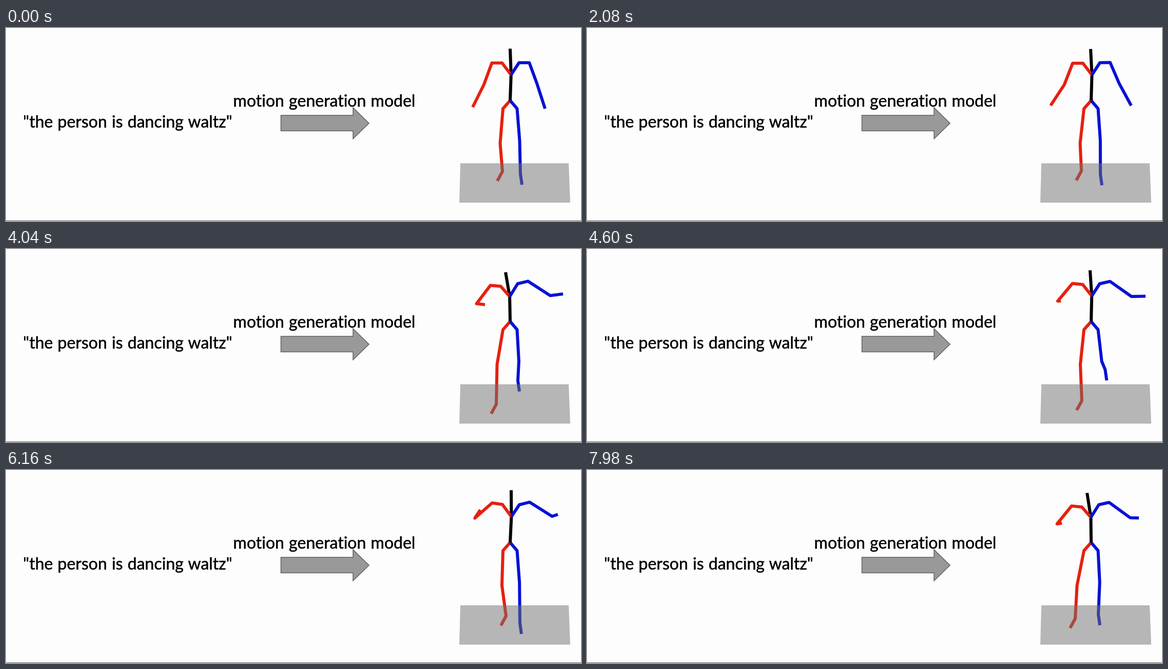
An HTML page for the animation above (8 s loop, 1120x378 px).

```html
<!DOCTYPE html>
<html lang="en">
<head>
<meta charset="utf-8">
<title>Motion generation</title>
<style>
  html, body { margin: 0; width: 100%; height: 100%; overflow: hidden; background: #fdfdfd; }
  svg { display: block; width: 1120px; height: 378px; }
  text {
    font: 32px Lato, sans-serif; font-variant-ligatures: none; word-spacing: 1px;
    text-anchor: middle; fill: #000; stroke: #000; stroke-width: .5;
  }
  .arrow { fill: #999; stroke: #606060; stroke-width: 1.5; }
  .floor { fill: #707070; opacity: .5; }
  .limb { fill: none; stroke-width: 6; stroke-linejoin: round; }
  .red { stroke: #e6200f; }
  .blue { stroke: #0812d4; }
  .spine { stroke: #000; }
</style>
</head>
<body>
<svg viewBox="0 0 1120 378">
  <path class="arrow" d="M535.5 171H676V156L707 186.5L676 217V201.500H535.5Z"/>
  <text x="620" y="154">motion generation model</text>
  <text x="237" y="195">"the person is dancing waltz"</text>
  <path class="limb red" id="redLeg"/>
  <path class="limb blue" id="blueLeg"/>
  <path class="limb spine" id="spine"/>
  <path class="limb red" id="redArm"/>
  <path class="limb blue" id="blueArm"/>
  <path class="floor" d="M885 265H1096L1099 342H883Z"/>
  <rect y="377" width="1120" height="1" fill="#606060"/>
</svg>
<script>
const LOOP = 8000;
const PELVIS = [982, 142];

// Key poses: sideways lean of the head, then where hands and ankles are.
const poses = [
  { at: 0,    lean: 0,  redHand: [909, 155], blueHand: [1050, 158], redAnkle: [967, 281], blueAnkle: [1002, 286] },
  { at: 2080, lean: -1, redHand: [903, 152], blueHand: [1060, 152], redAnkle: [963, 280], blueAnkle: [1000, 287] },
  { at: 3100, lean: -8, redHand: [913, 125], blueHand: [1082, 104], redAnkle: [950, 269], blueAnkle: [994, 276] },
  { at: 4040, lean: -9, redHand: [933, 109], blueHand: [1085, 88],  redAnkle: [955, 304], blueAnkle: [997, 258] },
  { at: 5180, lean: 5,  redHand: [913, 94],  blueHand: [1091, 97],  redAnkle: [973, 290], blueAnkle: [1022, 214] },
  { at: 6160, lean: 2,  redHand: [924, 78],  blueHand: [1075, 87],  redAnkle: [974, 286], blueAnkle: [1001, 300] },
  { at: 7980, lean: -8, redHand: [925, 104], blueHand: [1075, 94],  redAnkle: [951, 291], blueAnkle: [996, 283] }
];

const mix = (a, b, k) => a + (b - a) * k;
const mixPoint = (p, q, k) => p.map((v, i) => mix(v, q[i], k));
const move = ([x, y], dx, dy) => [x + dx, y + dy];

function swing(from, degrees, length) {
  const a = degrees * Math.PI / 180;
  return move(from, Math.sin(a) * length, Math.cos(a) * length);
}

function draw(id, ...points) {
  document.getElementById(id).setAttribute("d", "M" + points.join("L"));
}

function poseAt(t) {
  const next = Math.max(1, poses.findIndex(p => p.at > t));
  const i = t >= poses.at(-1).at ? poses.length - 1 : next;
  const a = poses[i - 1], b = poses[i];
  const k = Math.min(1, (t - a.at) / (b.at - a.at));
  const pose = { lean: mix(a.lean, b.lean, k) };
  for (const joint of ["redHand", "blueHand", "redAnkle", "blueAnkle"])
    pose[joint] = mixPoint(a[joint], b[joint], k);
  return pose;
}

function drawBody({ lean, redHand, blueHand, redAnkle, blueAnkle }) {
  const head = [PELVIS[0] + lean, 40.5 - lean * .55];
  const chest = move(PELVIS, 1.8 + lean * .3, -50.3 - lean * .15);
  draw("spine", head, chest, PELVIS);

  // A raised hand lifts the shoulder and swings the upper arm outwards.
  const redLift = 155 - redHand[1];
  const redNeck = [chest[0] - 17.5, 68.5 - lean * .5];
  const redShoulder = move(redNeck, -20, -redLift * .04);
  const redElbow = swing(redShoulder, -20 - redLift * .37, 45);
  draw("redArm", chest, redNeck, redShoulder, redElbow, redHand);

  const blueLift = 158 - blueHand[1];
  const blueNeck = [chest[0] + 15.5, 68];
  const blueShoulder = move(blueNeck, 20, -blueLift * .07);
  const blueElbow = swing(blueShoulder, 20 + blueLift * .53, 44 + blueLift * .11);
  draw("blueArm", chest, blueNeck, blueShoulder, blueElbow, blueHand);

  // Knees stay at one height and follow the ankles sideways.
  const redHip = move(PELVIS, -14, 16);
  const redKnee = move(redHip, (redAnkle[0] - redHip[0]) * .5 - 5, 68);
  draw("redLeg", PELVIS, redHip, redKnee, redAnkle, move(redAnkle, -10, 18.5));

  const blueHip = move(PELVIS, 13.5, 16);
  const blueKnee = move(blueHip, (blueAnkle[0] - blueHip[0]) * .3 + 3, 62);
  draw("blueLeg", PELVIS, blueHip, blueKnee, blueAnkle, move(blueAnkle, 3, 21));
}

function frame() {
  drawBody(poseAt(performance.now() % LOOP));
  requestAnimationFrame(frame);
}
frame();
</script>
</body>
</html>
```
